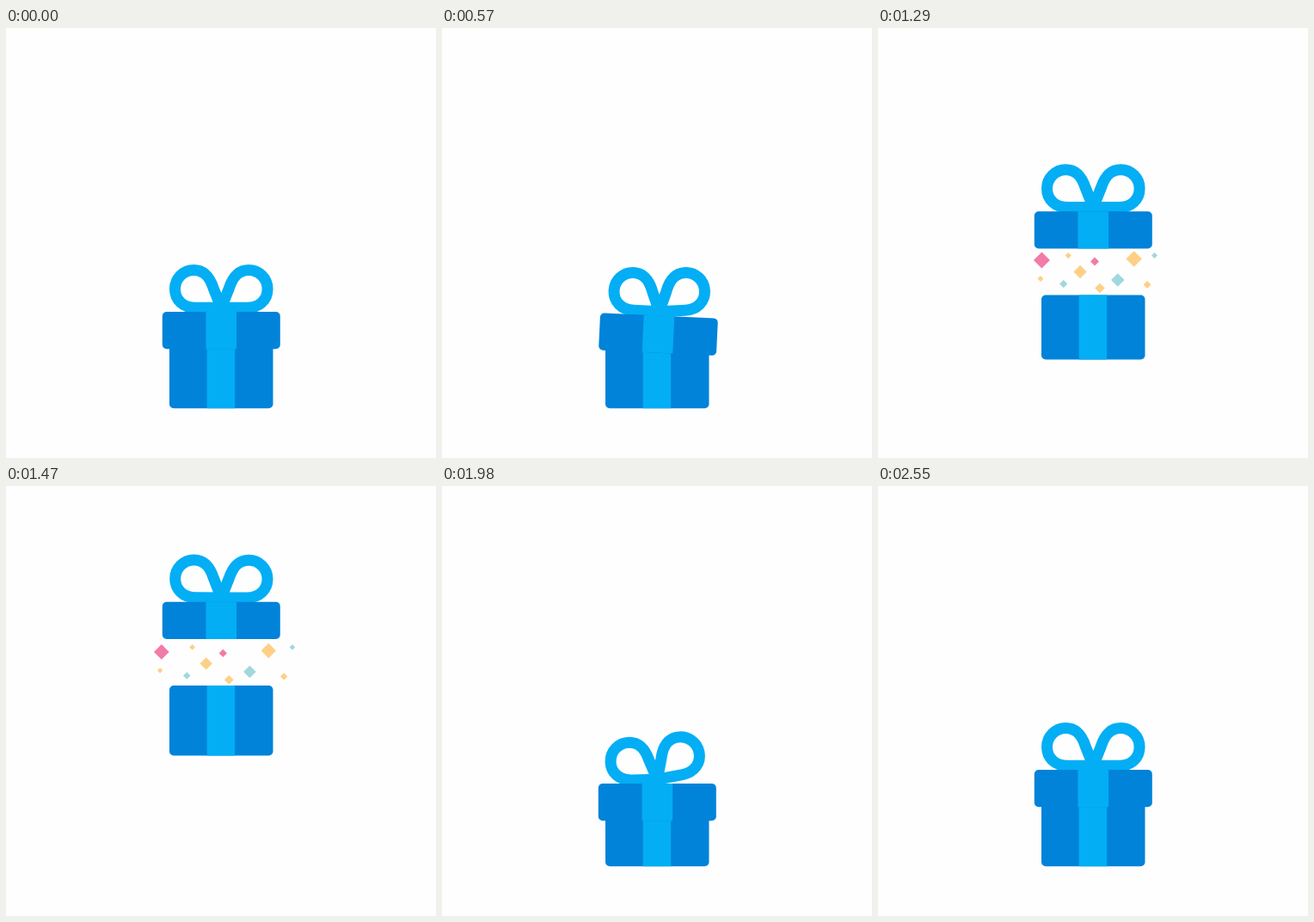
Animation, 500 px wide and 500 px high, one loop 3.06 s. Source, as an HTML page with a canvas:

```html
<!DOCTYPE html>
<html lang="en">
<head>
<meta charset="utf-8">
<title>Gift box</title>
<style>
  html, body { margin: 0; width: 100%; height: 100%; overflow: hidden; background: #fefefe; }
  canvas { display: block; width: 500px; height: 500px; }
</style>
</head>
<body>
<canvas id="stage" width="500" height="500"></canvas>
<script>
const LOOP = 3060;
const BLUE = '#0083d9', RIBBON = '#03aef4';
const PINK = '#f27ba8', ORANGE = '#fdd086', TEAL = '#a0d8dd';
const ctx = document.getElementById('stage').getContext('2d');
const { sin, cos, exp, min, max, PI } = Math;

const ramp = (t, from, to) => min(1, max(0, (t - from) / (to - from)));
const bump = (t, peak, width) => exp(-(((t - peak) / width) ** 2));

// A burst upwards that slows down, then a fall that speeds up.
const flight = (t, start, height) =>
  -height * (1 - exp((start - t) / 65)) + exp((t - 1377) / 111);

function lidOffset(t) {
  const pressed = t < 1500
    ? 18 * ramp(t, 210, 1170) ** 1.44
    : 16 * (1 - ramp(t, 1980, 2550)) ** 2;
  return min(pressed, flight(t, 1235, 203));
}

// The shaking before the jump, then the loops trailing behind the lid.
function tilts(t) {
  const strength = 2.7 * ramp(t, 210, 270) * (1 - ramp(t, 1110, 1230));
  const shake = strength * cos(2 * PI * (t - 570) / 300);
  return {
    lid: shake * (1 - ramp(t, 870, 1000)),
    left: shake + 7.5 * bump(t, 1710, 150) - 1.5 * bump(t, 1980, 100),
    right: -strength * cos(2 * PI * (t - 570) / 225) - 11 * bump(t, 1980, 237)
  };
}

// x from the centre, y below the lid, half diagonal
const confetti = {
  [PINK]: [[-60, 13.5, 9.5], [2, 15, 5]],
  [ORANGE]: [[-29, 8, 3.6], [48, 12, 9.3], [-15, 27, 7.7], [-61.5, 35, 3.5], [8, 46, 5.8], [63.5, 42, 4.5]],
  [TEAL]: [[72, 8, 3.5], [-34.5, 41, 4.6], [29, 36.5, 7.8]]
};
const loopPath = new Path2D(
  'M0 0H-30C-44 0-53.8-9-53.8-21.8C-53.8-34-44-43.8-32-43.8C-18-43.8-12.5-33-9-22.5Z');

const radians = degrees => degrees * PI / 180;

function panel(x, y, width, height, color, radius = 0) {
  ctx.fillStyle = color;
  ctx.beginPath();
  ctx.roundRect(x, y, width, height, radius);
  ctx.fill();
}

function drawConfetti(t, lidBottom, gap) {
  if (gap <= 0) return;
  const spread = 1.16 - ((t - 1520) / 560) ** 2;
  const age = (t - 1290) / 420;
  for (const [color, bits] of Object.entries(confetti)) {
    ctx.fillStyle = color === PINK && t >= 1500 ? ORANGE : color;
    for (const [dx, dy, half] of bits) {
      const x = 250 + dx * spread;
      const y = lidBottom + (dy + 3.3 * age) * gap / 54;
      const r = half * (1 - 0.15 * age);
      ctx.beginPath();
      ctx.moveTo(x, y - r);
      ctx.lineTo(x + r, y);
      ctx.lineTo(x, y + r);
      ctx.lineTo(x - r, y);
      ctx.fill();
    }
  }
}

function drawBowLoop(x, y, side, tilt) {
  ctx.save();
  ctx.translate(x, y);
  ctx.rotate(radians(tilt));
  ctx.scale(side, 1);
  ctx.strokeStyle = RIBBON;
  ctx.lineWidth = 13;
  ctx.lineJoin = 'round';
  ctx.stroke(loopPath);
  ctx.restore();
}

function draw(t) {
  const lid = lidOffset(t), tilt = tilts(t), lidAngle = radians(tilt.lid);
  const lidBottom = 373.3 + lid;
  const boxTop = min(lidBottom + 54, 366 + max(0, lid));
  const boxBottom = 442.3 + min(0, flight(t, 1255.5, 136));
  ctx.clearRect(0, 0, 500, 500);
  drawConfetti(t, lidBottom, boxTop - lidBottom);

  panel(190, boxTop, 120.5, boxBottom - boxTop, BLUE, 5);
  panel(233.7, boxTop, 32.5, boxBottom - boxTop, RIBBON);

  const knotX = 250.3 + 52 * sin(lidAngle), knotY = 325.3 + lid;
  drawBowLoop(knotX, knotY, 1, tilt.left);
  drawBowLoop(knotX, knotY, -1, tilt.right);

  ctx.save();
  ctx.translate(250.3, 377 + lid);
  ctx.rotate(lidAngle);
  panel(-68.5, -47, 137, 43.3, BLUE, 5);
  panel(-17.8, -47, 35.6, 43.3, RIBBON);
  ctx.restore();
}

function tick() {
  draw(performance.now() % LOOP);
  requestAnimationFrame(tick);
}
tick();
</script>
</body>
</html>
```
